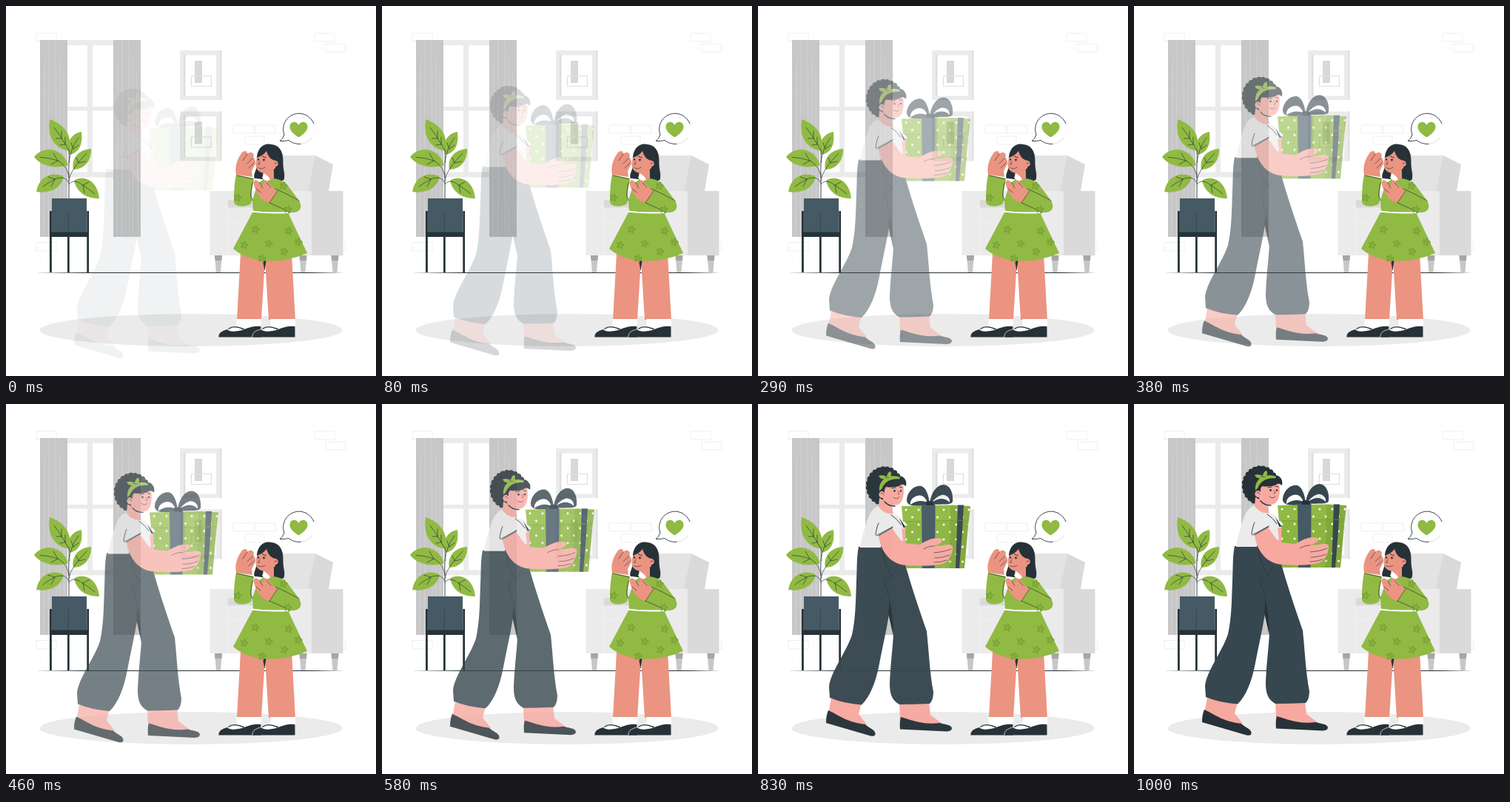
An HTML page for the animation above (1040 ms loop, 500 by 500 pixels).

```html
<!DOCTYPE html>
<html lang="en">
<head>
<meta charset="utf-8">
<title>A gift arrives</title>
<style>
  html, body { margin: 0; width: 100%; height: 100%; overflow: hidden; background: #fff; }
  svg { display: block; width: 100vw; height: 100vh; }
  .ink { fill: none; stroke: #263238; stroke-width: .9; stroke-linecap: round; stroke-linejoin: round; }
  .thin { stroke-width: .65; }
  .bold { stroke-width: 1.4; }
  .dark { fill: #263238; }
  .green { fill: #90ba43; }
  .rose { fill: #eb9481; }
  .skin { fill: #f7a9a0; }
  .pants { fill: #37474f; }
  .brick { fill: none; stroke: #e8e8e8; stroke-width: .7; }
</style>
</head>
<body>
<svg viewBox="0 0 500 500" xmlns="http://www.w3.org/2000/svg">
  <defs>
    <g id="curtain">
      <path fill="#c7c7c7" d="M46 46H83V312H46Z"/>
      <path fill="none" stroke="#dadada" stroke-width=".6" d="M52 72L51 312M58 46L57.500 312M67 46L68 312M73 70L72.500 312M78 90L79 312"/>
    </g>
    <g id="picture">
      <path fill="#ebebeb" d="M235 60H291V127H235Z"/>
      <path fill="#dedede" d="M289.500 60H291.500V127H289.500ZM240 66H243V122H240Z"/>
      <path fill="#fff" d="M242.500 66.500H284V121.500H242.500Z"/>
      <path fill="#d8d8d8" d="M255 74H265V104H255Z"/>
      <path fill="none" stroke="#dedede" stroke-width="1.200" d="M250.500 94.500H277.500V108.500H250.500Z"/>
    </g>
    <g id="sofaLeg">
      <path fill="#c7c7c7" d="M-5 337H5L3 360H-3Z"/>
      <path fill="#a6a6a6" d="M-5 337H5L4.400 344H-4.400Z"/>
    </g>
    <g id="flower" fill="#7da539"></g>
    <pattern id="dots" width="17" height="20" patternUnits="userSpaceOnUse" x="196" y="137">
      <g fill="#fff"><circle cx="4" cy="5" r="1.500"/><circle cx="12.500" cy="15" r="1.500"/></g>
    </pattern>
    <linearGradient id="floor" x1="43" x2="455" gradientUnits="userSpaceOnUse">
      <stop offset="0" stop-color="#263238" stop-opacity=".1"/>
      <stop offset=".15" stop-color="#263238"/>
      <stop offset=".9" stop-color="#263238"/>
      <stop offset="1" stop-color="#263238" stop-opacity=".1"/>
    </linearGradient>
    <g id="shoe">
      <path fill="#fff" d="M23.500 423H57V436L36 442L11 439Q22 435 23.500 430Z"/>
      <path class="dark" d="M-.5 447.500C-1 441 5 439 11 437Q14 440.500 22 439.500C36 438.500 41 431 56.500 433V447.500Z"/>
      <path class="ink bold" d="M13 436Q20 431 33 436.500"/>
    </g>
  </defs>

  <!-- room -->
  <path class="brick" d="M41 37H68V47.500H41ZM417 37H444V48H417ZM432 51H459V62H432ZM307 161H335V172H307ZM337 161H364V172H337ZM323 176H349V187H323ZM41 319.500H68V331H41ZM432 319.500H459V331H432Z"/>
  <path fill="#ebebeb" d="M83 46H145V53H83ZM110 53H117V225H110ZM83 136H145V141.500H83ZM83 224.500H145V231.500H83Z"/>
  <use href="#curtain"/>
  <use href="#curtain" x="99"/>
  <use href="#picture"/>
  <use href="#picture" y="82.500"/>

  <!-- sofa -->
  <path fill="#e3e3e3" d="M374 202H418L410 250H350Z"/>
  <path fill="#dadada" d="M418 202L442 214L436 250H408Z"/>
  <path fill="#ebebeb" d="M275.500 250H414V337H275.500Z"/>
  <path fill="#dadada" d="M413 250H455.500V337H413ZM299 262H340V273H299Z"/>
  <path fill="none" stroke="#f4f4f4" stroke-width=".8" d="M299 262V337M299 273H335M299 292.500H330"/>
  <use href="#sofaLeg" x="287"/>
  <use href="#sofaLeg" x="401.500"/>
  <use href="#sofaLeg" x="444.500"/>

  <path fill="url(#floor)" d="M43 360.100H455V361H43Z"/>
  <ellipse cx="250" cy="438" rx="204.500" ry="22" fill="#ebebeb"/>

  <!-- plant -->
  <g class="green">
    <path d="M85 195.500C67 193 55 179 59 153C77 159 91 174 85 195.500Z"/>
    <path d="M86 201C80 188 87 172 102 170C104 185 100 198 86 201Z"/>
    <path d="M84 215C70 220 48 218 38 204C48 190 75 188 84 215Z"/>
    <path d="M91 221C88 207 97 194 115 193C116 207 107 221 91 221Z"/>
    <path d="M78 231C69 224 45 226 41 251C58 254 74 247 78 231Z"/>
    <path d="M92 236C101 229 123 232 126 260C109 260 96 253 92 236Z"/>
  </g>
  <g class="ink">
    <path d="M85 261V232C84 220 86 206 85 195"/>
    <path class="thin" d="M85 195Q74 176 65 164M85 232Q84 218 72 210Q60 205 46 204.500M85 212Q87 192 98 178M85 236Q86 222 109 199M85 240Q82 229 68 233Q58 238 50 244M85 241Q90 234 99 239Q112 247 120 254"/>
    <path class="thin" d="M75 179L68 179M75 179L75 169M80 187L73 188M80 187L80 177M91 193L88 185M91 193L98 188M70 209L61 214M70 209L64 199M98 212L95 205M98 212L107 210M66 234L57 231M66 234L61 244M104 242L112 238M104 242L106 252"/>
  </g>
  <path fill="#455a64" d="M62 260H109V306H62Z"/>
  <path class="dark" d="M59 277H61.800V360H59ZM109.300 277H112V360H109.300ZM59 305.500H112V312H59ZM83 312H85.700V360H83Z"/>
  <path fill="none" stroke="#37474f" d="M84.300 277V306"/>

  <!-- speech bubble -->
  <circle cx="395.500" cy="165.500" r="21" fill="#fff"/>
  <path class="ink" d="M416 159A21.300 21.300 0 0 0 376 174Q374 180 370 182.500Q377 183 382 181.500Q389 187 398 186.500"/>
  <path class="ink thin" opacity=".3" d="M398 186.500Q407 186 413 178"/>
  <path class="green" d="M395.500 177.500C388 173 383.500 168 383.500 163.500C383.500 155 393 155 395.500 161C398 155 407.500 155 407.500 163.500C407.500 168 403 173 395.500 177.500Z"/>

  <!-- girl -->
  <path class="rose" d="M317 335L312 424H345L350 343L355 424H391L386 335Z"/>
  <path class="dark" d="M347 344H351.500L349.500 358Z"/>
  <use href="#shoe" x="288"/>
  <use href="#shoe" x="334"/>
  <path fill="none" stroke="#fff" stroke-width=".7" d="M333 447.500C332 441 339 438 346 436.500"/>
  <path class="dark" d="M339 203C341 190 350 185 358 187C371 188 375 199 374.500 211C374 221 378 227 375.500 235C362 241 350 233 336 233C333 228 340 221 339 212Z"/>
  <path class="green" d="M334 278L333 262L341 239L350 233C363 232 374 234 381 243L396 263C401 272 398 278 389 279Z"/>
  <path class="rose" d="M347 222H362V233L352 237L347 233Z"/>
  <path class="rose" d="M340 203C336 212 336 222 345 225C356 228 365 222 366 212L361 198L350 194Z"/>
  <path class="dark" d="M340 204C343 191 355 185 366 192C373 200 371 215 368 225L365 209C357 208 354 202 352 196C349 200 345 203 340 204Z"/>
  <circle class="rose" cx="364" cy="213" r="3.800"/>
  <path class="ink thin" d="M362.500 213Q364 211 366 212.500M343.500 210L340.500 214H343M341 218.500Q345 221.500 350 218"/>
  <path class="ink" d="M346.500 203L351.500 205M339.500 204.500L342 203.500"/>
  <circle class="dark" cx="348.500" cy="208" r="1.400"/><circle class="dark" cx="341" cy="207.500" r="1.200"/>
  <path fill="#fff" d="M346 232L349 226L355 231L357 235L351 237Z"/>
  <path class="green" d="M311 228L335 233C334 243 330 254 333 262L330 268C321 272 308 272 308 263C308 248 309 238 311 228Z"/>
  <path class="rose" d="M311 228C309 217 312 208 318 199C321 195 327 195 326 200C331 195 337 199 334 205C338 207 338 213 335 217L332 223L333 231Z"/>
  <path class="ink thin" d="M326 200L320 209M334 205L326 213M335 212L328 219M312 229L334 234M333 239C331 250 329 257 333 262"/>
  <path class="green" d="M333 279L307 328C326 345 365 352 407 334L381 279Z"/>
  <path fill="#fff" d="M333 276.500Q356 280 382 278V280Q356 281.500 332 278.500Z"/>
  <path class="rose" d="M335 241C333 235 339 233 343 239L350 242C345 236 349 232 354 238L367 251L356 266C346 264 338 255 335 241Z"/>
  <path class="ink thin" d="M343 239L347 246M338 247L344 252M352 239L358 245M356 266L367 250M364 247Q382 255 396 263M356 266L384 278.500"/>
  <g id="flowers"></g>

  <!-- woman with gift -->
  <g id="woman">
    <path class="skin" d="M99 397L140 403L136 418L147 432L128 437L95 418Z"/>
    <path class="dark" d="M95 413C107 418 119 429 145 432C150 437 158 439 158.500 444Q159 449 152 447.500L92 430Q92 419 95 413Z"/>
    <path class="skin" d="M191 402H231L233 419L249 431L218 435L192 427Z"/>
    <path class="dark" d="M193 422C208 426 221 433 246 430C251 432 261 432 262 437Q262 441 255 441.500L192 438.500Q191 428 193 422Z"/>
    <path class="pants" d="M136 192C133 206 134 222 133 238C132 265 132 289 127 311C119 335 98 361 96 381L97 396Q117 404 140 405.500C151 395 159 376 164 350C169 324 174 303 178 277L200 216L185 191Z"/>
    <path class="pants" d="M150 191H185L199 216C208 248 219 280 228 306C231 334 232 362 237 388Q237 399 232 404Q210 405 191 405C180 399 178 389 178 377C179 350 182 330 183 310L176 270Z"/>
    <path class="dark" d="M178 264L176 282L183 313Q183 290 178 264Z"/>
    <path class="ink thin" d="M168 196Q171 220 182 232M170 235Q184 234 188 220M178 264Q173 248 170 236"/>

    <g id="curls" class="dark"></g>
    <path class="skin" d="M190 160L199 166L202 190H194Z"/>
    <path fill="#ebebeb" d="M162 137C151 142 148 154 144 168C140 180 139 187 138 193H166L168 181L196 184L193 158Q190 151 178 146Z"/>
    <path fill="#ebebeb" d="M178 147Q190 148 194 155L200 166L191 169Z"/>
    <path class="dark" d="M191 153L199.500 165.500L196.500 166Z"/>
    <path class="skin" d="M164 126L163 138Q171 149 183 147L179 134Z"/>
    <path class="skin" d="M168 113C179 106 190 104 196 108C198 117 197 129 191 134C184 138 174 136 169 128Z"/>
    <path class="ink bold" d="M171 131Q176 137 185 137"/>
    <circle class="skin" cx="168" cy="121.500" r="4.600"/>
    <path class="dark" d="M167 116C166 101 182 94 195 97Q202 102 200 110L195 107Q188 113 173 111Q170 115 171 119Z"/>
    <path class="green" d="M164 117C163 106 169 99 177 97Q185 95 192 98L191 100.500C180 99 171 104 167.500 113Z"/>
    <path class="green" d="M174 100Q166 102 163 96Q168 94 174 97Q175 91 179 90Q182 95 177 100Z"/>
    <path class="ink thin" d="M172 98L177 99M166 120Q168 118 170 122M189 117Q193 121 189 121M183 125Q187 129 191 125"/>
    <path class="ink" d="M181 113L186 112M191 111L195 112"/>
    <circle class="dark" cx="184.500" cy="116.500" r="1.400"/><circle class="dark" cx="193" cy="116.500" r="1.300"/>
    <path class="ink" d="M180 149Q188 154 193 162M160 177L182 165M159 176Q160 166 163 160"/>

    <path fill="#37474f" fill-rule="evenodd" d="M231 136C218 137 203 139 201 130C201 118 211 108 221 110C228 113 231 124 232 134ZM229 132C226 125 222 121 215 123C208 125 205 131 206 135Q217 127 229 132ZM232 135C233 119 242 108 251 108C260 109 264 119 263 131C262 136 247 134 232 135ZM235 132Q249 122 259 132C260 126 254 121 248 122C242 124 238 128 235 132Z"/>
    <path fill="#80a83a" d="M261 154H285L279 221H259Z"/>
    <path fill="#8bb53f" d="M199 156H261L259 221H200Z"/>
    <path class="green" d="M194 137L262 135.500V156L196 158Z"/>
    <path fill="#84ad3c" d="M262 135.500L287 137L285 156L261 157Z"/>
    <path fill="url(#dots)" d="M194 137L287 136.500L285 156L279 221H200L199 158L196 158Z"/>
    <path fill="#455a64" d="M221 135H239.500V157L238.500 221H222Z"/>
    <path fill="#37474f" d="M270 135.500H278L276 172L272 221H267Z"/>
    <path fill="none" stroke="#729a31" stroke-width=".7" d="M197 158L221 157.500M239 157L284 156M261 137L259 221"/>
    <path class="dark" d="M227 131Q232 129 237 131L238 136H227Z"/>

    <path class="skin" d="M163 177L181 167C187 174 190 181 197 187L218 189C227 184 237 178 248 181C252 184 246 188 238 191C247 192 258 186 263 191C264 199 259 211 250 215Q231 219 202 217C181 217 166 200 163 177Z"/>
    <path class="ink thin" d="M238 191Q230 191 224 195M261 195Q252 199 238 200M259 203Q250 207 239 207M255 210Q247 213 238 213"/>
    <path class="ink" d="M163 177L182 166"/>
  </g>
</svg>
<script>
  const get = id => document.getElementById(id);
  const times = (n, make) => Array.from({ length: n }, (_, k) => make(k)).join("");

  get("flower").innerHTML = times(5, k =>
    `<ellipse cx="3.400" rx="2.400" ry="1.700" transform="rotate(${k * 72 - 75})"/>`);

  const blooms = [[322, 323], [337, 302], [355, 321], [382, 304], [376, 332], [395, 319], [346, 341], [375, 243], [381, 275], [313, 259]];
  get("flowers").innerHTML = blooms.map(([x, y]) => `<use href="#flower" x="${x}" y="${y}"/>`).join("");

  // bumps around the hair, from below the ear to above the brow
  get("curls").innerHTML = '<ellipse cx="171" cy="110" rx="22.500" ry="23.500"/>' + times(18, k => {
    const a = 1.75 + k * .26;
    return `<circle cx="${171 + 21.5 * Math.cos(a)}" cy="${110 + 23 * Math.sin(a)}" r="3.800"/>`;
  });

  const LOOP = 1040, STEPS = 25;
  const woman = get("woman");

  // 24 pictures a second, each start rounded to 10 ms
  function draw(now) {
    const ticks = Math.floor(now % LOOP / 10);
    const step = Math.floor((ticks + .49) * .24);
    const shown = Math.sin((step + 1) / STEPS * Math.PI / 2);
    woman.setAttribute("opacity", shown);
    woman.setAttribute("transform", `translate(0 ${30 * (1 - shown)})`);
  }

  function loop() {
    draw(performance.now());
    requestAnimationFrame(loop);
  }
  loop();
</script>
</body>
</html>
```
